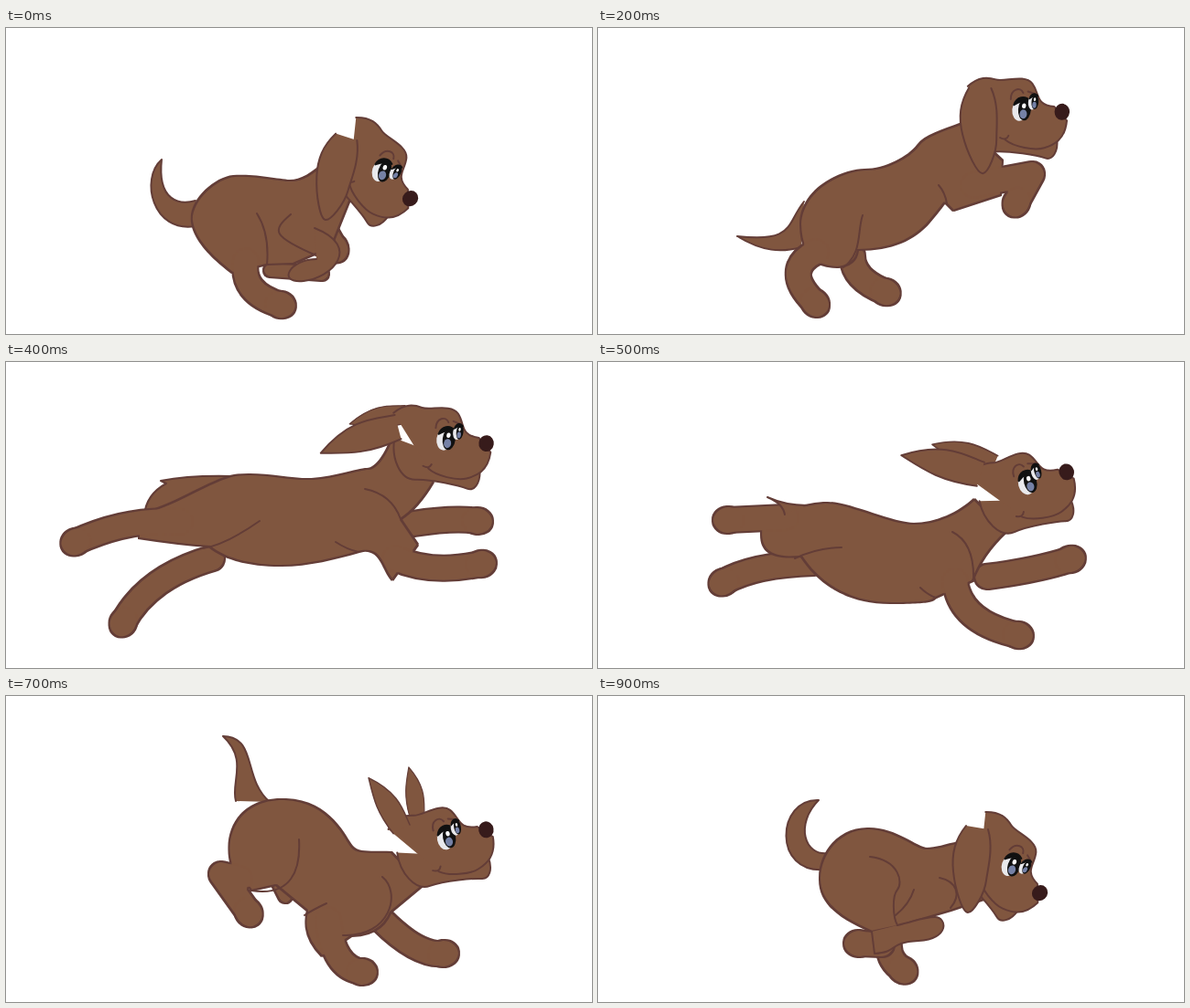
Animation of 640 by 335 pixels, one loop 1000 ms. Source, as an HTML page without scripts:

```html
<!DOCTYPE html>
<html lang="en">
<head>
<meta charset="utf-8">
<title>Running puppy</title>
<style>
html, body { margin: 0; width: 100%; height: 100%; overflow: hidden; background: #fff; }
svg { display: block; width: 100%; height: 100%; --fur: #80563f; --ink: #633d37; }
path { fill: var(--fur); stroke: var(--ink); stroke-width: 2; stroke-linejoin: round; stroke-linecap: round; }
.line { fill: none; }
/* overlapping parts share one outline */
.fuse { filter: url(#outline); }
.fuse path { stroke: none; }
.fuse .leg, .fuse .stub { fill: none; stroke: var(--fur); stroke-width: 28; }
.fuse .leg { marker-end: url(#paw); }
.fuse .stub { stroke-width: 16; }
.eye { transform: rotate(var(--gaze, 0deg)); }
.down { --gaze: -28deg; }
.pose { visibility: hidden; animation: show 1s step-end infinite; animation-delay: calc(var(--i) * .1s - 1s); }
@keyframes show {
  0% { visibility: visible; }
  10%, 100% { visibility: hidden; }
}
</style>
</head>
<body>
<svg viewBox="0 0 640 335">
<defs>
  <filter id="outline" filterUnits="userSpaceOnUse" x="0" y="0" width="640" height="335" color-interpolation-filters="sRGB">
    <feMorphology in="SourceAlpha" operator="dilate" radius="1" result="grown"/>
    <feFlood flood-color="#633d37"/>
    <feComposite in2="grown" operator="in" result="ink"/>
    <feMorphology in="SourceGraphic" operator="erode" radius="1" result="fill"/>
    <feMerge><feMergeNode in="ink"/><feMergeNode in="fill"/></feMerge>
  </filter>
  <marker id="paw" markerUnits="userSpaceOnUse" markerWidth="40" markerHeight="40" orient="auto" overflow="visible">
    <ellipse rx="17" ry="15" fill="#80563f"/>
  </marker>
  <g id="eye">
    <ellipse cx="-2" cy="2" rx="8.5" ry="12" fill="#e9e9ec"/>
    <ellipse cx="3" cy="1" rx="7" ry="12" fill="#111"/>
    <ellipse cx="2" cy="6" rx="4" ry="5" fill="#7581a6"/>
    <path d="M-9-3C-7-12 2-15 8-9Q0-10-9-3Z" style="fill:#111;stroke:#111"/>
    <ellipse cx="2" cy="-3" rx="2.2" ry="2.8" fill="#fff"/>
  </g>
  <g id="head">
    <path d="M41 30C44 44 38 54 30 52S-10 47-27 50S-57 30-56 8"/>
    <path d="M-61-19C-50-31-40-31-31-29S0-38 9-28S14-5 35-5L50 9C50 30 38 37 28 41S-5 43-15 36"/>
    <path class="line" d="M-21 34Q-14 37-12 31M-13-9C-14-20-4-24 0-17M5-19L13-17"/>
    <use class="eye" href="#eye"/>
    <g transform="translate(12 -9) scale(.55 .68)"><use class="eye" href="#eye"/></g>
    <ellipse cx="44" rx="8.2" ry="9" fill="#371b1b"/>
  </g>
  <path id="ear" d="M14 4C20 25 14 45 12 60S-2 95-8 95S-22 70-24 50S-22 15-10 0"/>
  <path id="flap" d="M-13-2C-16 20-26 45 0 88C10 60 18 40 14 0"/>
</defs>

<!-- crouch -->
<g class="pose" style="--i:0">
  <path d="M207 189C190 194 165 190 170 144C146 165 160 225 207 217"/>
  <g class="fuse"><path class="stub" d="M345 269L289 265"/><path class="leg" d="M350 225L359 241"/></g>
  <g class="fuse">
    <path d="M350 145C335 160 322 167 311 167S270 160 249 162S200 190 203 212S230 255 247 268L285 259L314 258L355 240L377 185Z"/>
    <path class="leg" d="M262 255Q256 290 300 303"/>
  </g>
  <path class="line" d="M274 203Q288 225 285 259M311 204C290 222 290 228 341 250"/>
  <path d="M337 219C390 240 355 274 325 277S310 253 339 253"/>
  <use class="down" href="#head" transform="translate(411 155) rotate(46)"/>
  <use href="#ear" transform="translate(370 117) rotate(8)"/>
</g>

<!-- push off -->
<g class="pose" style="--i:1">
  <path d="M222 188C200 212 180 200 150 188C160 215 190 230 216 222"/>
  <g class="fuse"><path class="leg" d="M285 245Q280 280 310 288"/></g>
  <g class="fuse">
    <path d="M372 125C362 148 345 160 318 160S210 165 212 215S235 255 262 262L281 252Q345 245 365 222L440 215L425 170Z"/>
    <path class="leg" d="M245 245Q235 290 272 299"/>
    <path class="leg" d="M395 210L440 207L425 237"/>
  </g>
  <path class="line" d="M283 204Q292 235 279 254"/>
  <use href="#head" transform="translate(440 120) rotate(25)"/>
  <use href="#ear" transform="translate(392 98)"/>
</g>

<!-- rise -->
<g class="pose" style="--i:2">
  <path d="M225 190C205 215 215 235 152 228C180 245 200 246 222 240"/>
  <g class="fuse"><path class="leg" d="M278 250Q278 275 314 289"/></g>
  <g class="fuse">
    <path d="M398 104C375 113 358 117 349 129S315 155 292 155S222 175 221 215Q222 262 262 262Q282 260 284 243C320 243 345 232 362 212S375 195 379 191L388 200L440 183L442 145Z"/>
    <path class="leg" d="M238 245Q200 265 237 301"/>
    <path class="leg" d="M410 172L474 160L457 191"/>
  </g>
  <path class="line" d="M268 262C289 247 283 222 289 205M372 172Q379 180 381 192"/>
  <use href="#head" transform="translate(463 88) rotate(5)"/>
  <use href="#ear" transform="translate(415 64) rotate(-8)"/>
</g>

<!-- leap -->
<g class="pose" style="--i:3">
  <path d="M258 142C215 155 225 205 176 208Q200 210 215 204"/>
  <g class="fuse"><path class="leg" d="M285 225Q258 250 275 289"/><path class="leg" d="M490 147Q560 120 552 161"/></g>
  <g class="fuse">
    <path d="M440 79C410 88 385 103 365 114S290 137 258 142S222 180 205 220L215 255Q235 235 277 222C320 230 370 225 395 212S425 180 439 167L460 182L537 154L497 135L475 130L500 100Z"/>
    <path class="leg" d="M225 215Q175 270 186 301"/>
    <path class="leg" d="M470 150Q545 130 564 156"/>
  </g>
  <path class="line" d="M277 222Q298 210 311 189M427 164Q447 165 460 181M452 122L475 131"/>
  <use href="#head" transform="translate(526 49) rotate(-5)"/>
  <use href="#ear" transform="translate(474 30) rotate(5)"/>
</g>

<!-- full stretch -->
<g class="pose" style="--i:4">
  <path d="M245 125Q200 124 169 130L175 133Q153 145 151 168"/>
  <g class="fuse"><path class="leg" d="M225 215Q155 235 128 285"/><path class="leg" d="M445 177Q490 170 515 174"/></g>
  <g class="fuse">
    <path d="M421 84C415 100 405 117 395 117S355 128 330 128S275 120 250 124S180 160 145 166L145 193Q190 200 222 202C240 217 270 223 300 223S360 215 385 208S410 225 422 239L450 200L431 172Q450 160 467 131Z"/>
    <path class="leg" d="M190 175Q135 170 76 197"/>
    <path class="leg" d="M425 215Q465 233 519 221"/>
  </g>
  <path class="line" d="M215 204Q240 200 277 174M360 197Q372 205 385 208M392 139C412 143 425 155 431 172"/>
  <use href="#flap" transform="translate(436 57) rotate(80) scale(.7)"/>
  <use href="#head" transform="translate(481 83) rotate(8)"/>
  <use href="#flap" transform="translate(427 71) rotate(71)"/>
</g>

<!-- descend -->
<g class="pose" style="--i:5">
  <g class="fuse"><path class="leg" d="M235 220Q170 222 137 241"/><path class="leg" d="M425 235Q480 228 516 216"/></g>
  <g class="fuse">
    <path d="M411 150C395 165 370 177 345 177S270 152 247 154S178 165 178 188S195 215 222 213C240 240 270 264 320 264S365 260 369 258L409 240Q420 210 446 186Z"/>
    <path class="leg" d="M205 170L142 173"/>
    <path class="leg" d="M390 240Q395 285 459 299"/>
  </g>
  <path d="M228 157Q205 157 185 148Q202 155 204 167"/>
  <path class="line" d="M215 215Q240 203 266 203M387 186C405 195 411 215 410 240M352 247Q360 255 369 258"/>
  <use href="#flap" transform="translate(432 112) rotate(108) scale(.8)"/>
  <use href="#head" transform="translate(469 131) rotate(-14)"/>
  <use href="#flap" transform="translate(417 122) rotate(103)"/>
</g>

<!-- touch down -->
<g class="pose" style="--i:6">
  <path d="M265 138C235 135 220 95 195 90C205 110 205 135 235 155"/>
  <g class="fuse"><path class="leg" d="M270 220L212 238"/><path class="leg" d="M420 232Q465 260 500 248"/></g>
  <g class="fuse">
    <path d="M415 163C395 172 375 176 358 168S315 133 285 133S215 160 214 185S235 215 250 220C275 245 310 255 350 252L405 235L448 198Z"/>
    <path class="leg" d="M235 195L195 193"/>
    <path class="leg" d="M385 235Q375 290 425 300"/>
  </g>
  <path class="line" d="M245 218Q282 220 290 182M400 192Q420 210 404 240"/>
  <use href="#flap" transform="translate(442 124) rotate(140) scale(.7)"/>
  <use href="#head" transform="translate(475 144) rotate(-12)"/>
  <use href="#flap" transform="translate(424 135) rotate(125) scale(.9)"/>
</g>

<!-- land -->
<g class="pose" style="--i:7">
  <path d="M251 115C245 95 265 70 237 44C275 45 258 90 288 116"/>
  <g class="fuse"><path class="stub" d="M298 205L305 219"/><path class="leg" d="M410 245Q450 285 478 282"/></g>
  <g class="fuse">
    <path d="M421 171C400 170 385 173 378 165S355 115 305 113S236 150 246 185L268 213L295 207L329 235Q322 262 345 285L377 263Q410 262 420 237L456 207Z"/>
    <path class="leg" d="M255 200L235 195L265 237"/>
    <path class="leg" d="M352 245Q357 298 389 302"/>
  </g>
  <path class="line" d="M268 213C312 220 322 190 320 157M350 227Q335 234 326 240M411 198C432 215 420 264 368 262"/>
  <use href="#flap" transform="translate(449 130) rotate(170) scale(.6)"/>
  <use href="#head" transform="translate(481 154) rotate(-10)"/>
  <use href="#flap" transform="translate(432 145) rotate(147) scale(.75)"/>
</g>

<!-- gather -->
<g class="pose" style="--i:8">
  <path d="M262 150C220 150 240 90 232 76C195 95 200 165 252 168"/>
  <g class="fuse"><path class="leg" d="M408 230L406 290"/><path class="leg" d="M305 235L308 248"/></g>
  <g class="fuse">
    <path d="M405 175C385 172 372 170 362 160S325 129 300 129S243 155 243 185S260 232 285 240L400 240L424 232L435 210Z"/>
    <path class="leg" d="M280 230L286 254"/>
    <path class="leg" d="M365 235Q335 300 362 301"/>
  </g>
  <path class="line" d="M300 238Q332 225 326 180"/>
  <use href="#head" transform="translate(468 170) rotate(15)"/>
  <use href="#ear" transform="translate(416 142) rotate(10)"/>
</g>

<!-- tuck -->
<g class="pose" style="--i:9">
  <path d="M252 172C225 176 215 140 241 114C195 112 190 195 248 190"/>
  <g class="fuse"><path class="leg" d="M318 275Q318 290 333 300"/></g>
  <g class="fuse"><path class="leg" d="M310 272L285 271"/></g>
  <g class="fuse">
    <path d="M395 160C380 163 370 167 359 167S325 145 295 145S242 170 242 200S270 245 299 258L327 252L385 235L430 220Z"/>
  </g>
  <path d="M327 251C345 247 355 242 368 242S385 266 350 268S330 280 302 282L299 258"/>
  <path class="line" d="M297 176C330 180 333 205 327 212S322 242 327 251M345 212Q340 228 325 240M373 199C392 203 397 218 385 232"/>
  <use class="down" href="#head" transform="translate(452 184) rotate(46)"/>
  <use href="#ear" transform="translate(412 142)"/>
</g>
</svg>
</body>
</html>
```
